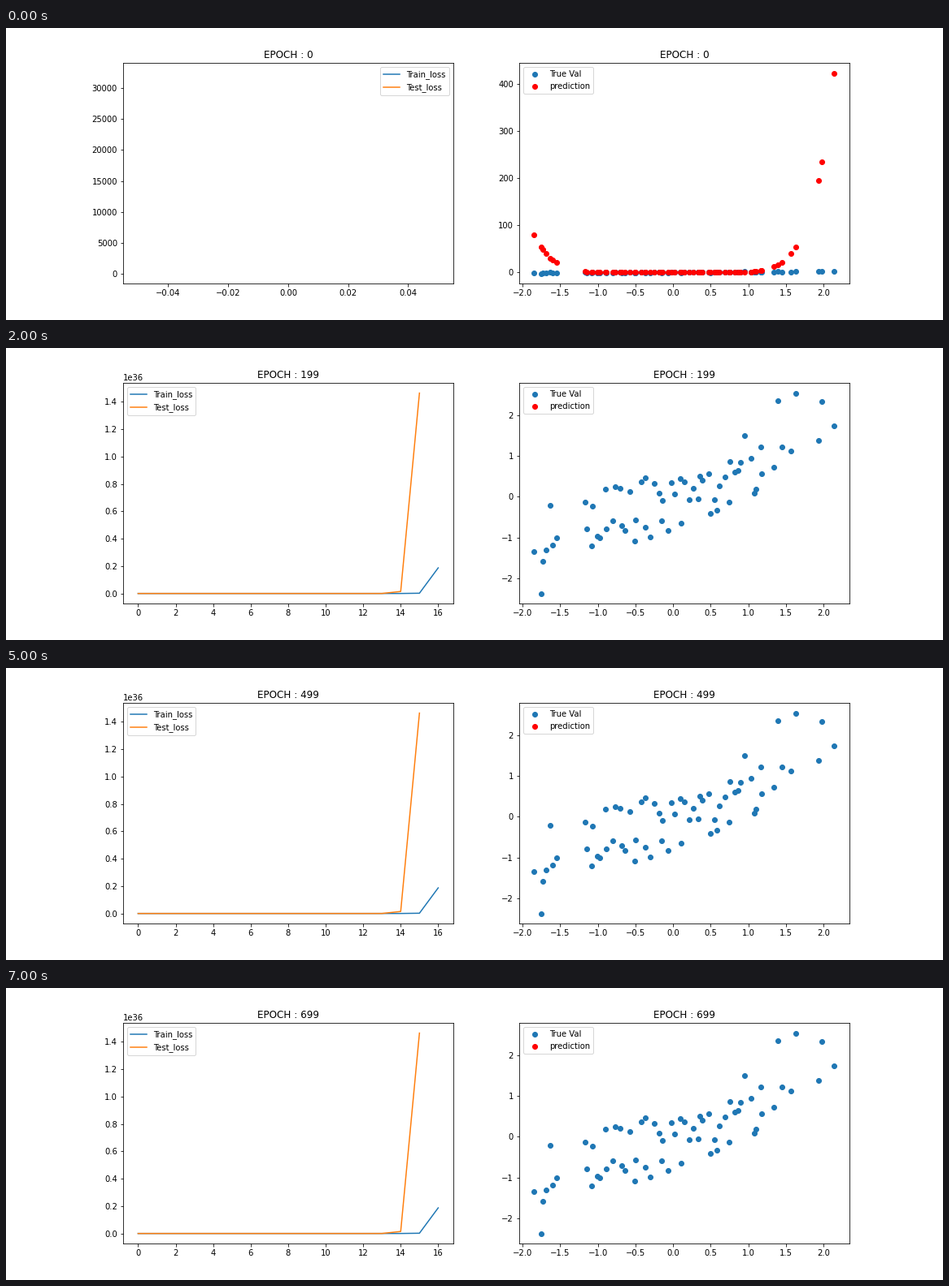
A matplotlib script for the animation above (8000 ms loop, 1152 by 360 pixels).

```python
import numpy as np
import matplotlib.pyplot as plt
from matplotlib.animation import FuncAnimation

FRAMES, INTERVAL = 8, 1000
CLOUD = 52

# the few samples at both ends set the axis limits
ENDS = [(-1.846, -1.34), (-1.753, -2.375), (-1.73, -1.59), (-1.69, -1.31),
        (-1.63, -0.215), (-1.607, -1.19), (-1.553, -1.01), (1.345, 0.72),
        (1.39, 2.35), (1.453, 1.22), (1.57, 1.12), (1.632, 2.54),
        (1.935, 1.38), (1.983, 2.33), (2.144, 1.735)]


def make_samples():
    """Noisy linear trend between the end samples."""
    rng = np.random.default_rng(4)
    x = np.linspace(-1.2, 1.2, CLOUD) + rng.uniform(-0.03, 0.03, CLOUD)
    y = 0.75 * x + rng.uniform(-0.9, 0.9, CLOUD)
    end_x, end_y = np.transpose(ENDS)
    return np.append(x, end_x), np.append(y, end_y)


def predict(x, epoch):
    """Steep untrained fit at the start, diverged to NaN afterwards."""
    if epoch:
        return np.full_like(x, np.nan)
    r = np.abs(x)
    fit = np.where(x > 0, 1.39 * r**7.5, 0.734 * r**7.68) - 1
    return np.maximum(fit, 0)


def blow_up(peak, last):
    """Loss growing a hundredfold per step until it overflows."""
    return peak * 100.0 ** (np.arange(last + 1) - last)


X, Y = make_samples()
fig, (left, right) = plt.subplots(1, 2, figsize=(16, 5), dpi=72)
fig.subplots_adjust(left=0.125, right=0.9, bottom=0.125, top=0.88, wspace=0.2)


def draw(i):
    epoch = max(0, 100 * i - 1)
    for ax in (left, right):
        ax.clear()
        ax.set_title(f"EPOCH : {epoch}")

    left.plot(blow_up(1.87e35, 16) if epoch else [40], label="Train_loss")
    left.plot(blow_up(1.463e36, 15) if epoch else [32440], label="Test_loss")
    left.legend(loc="upper left" if epoch else "upper right")

    right.scatter(X, Y, label="True Val")
    right.scatter(X, predict(X, epoch), color="red", label="prediction")
    right.legend(loc="upper left", scatteryoffsets=[0.5])
    return []


anim = FuncAnimation(fig, draw, frames=FRAMES, init_func=lambda: draw(0),
                     interval=INTERVAL, repeat=True, repeat_delay=0)
plt.show()
```
